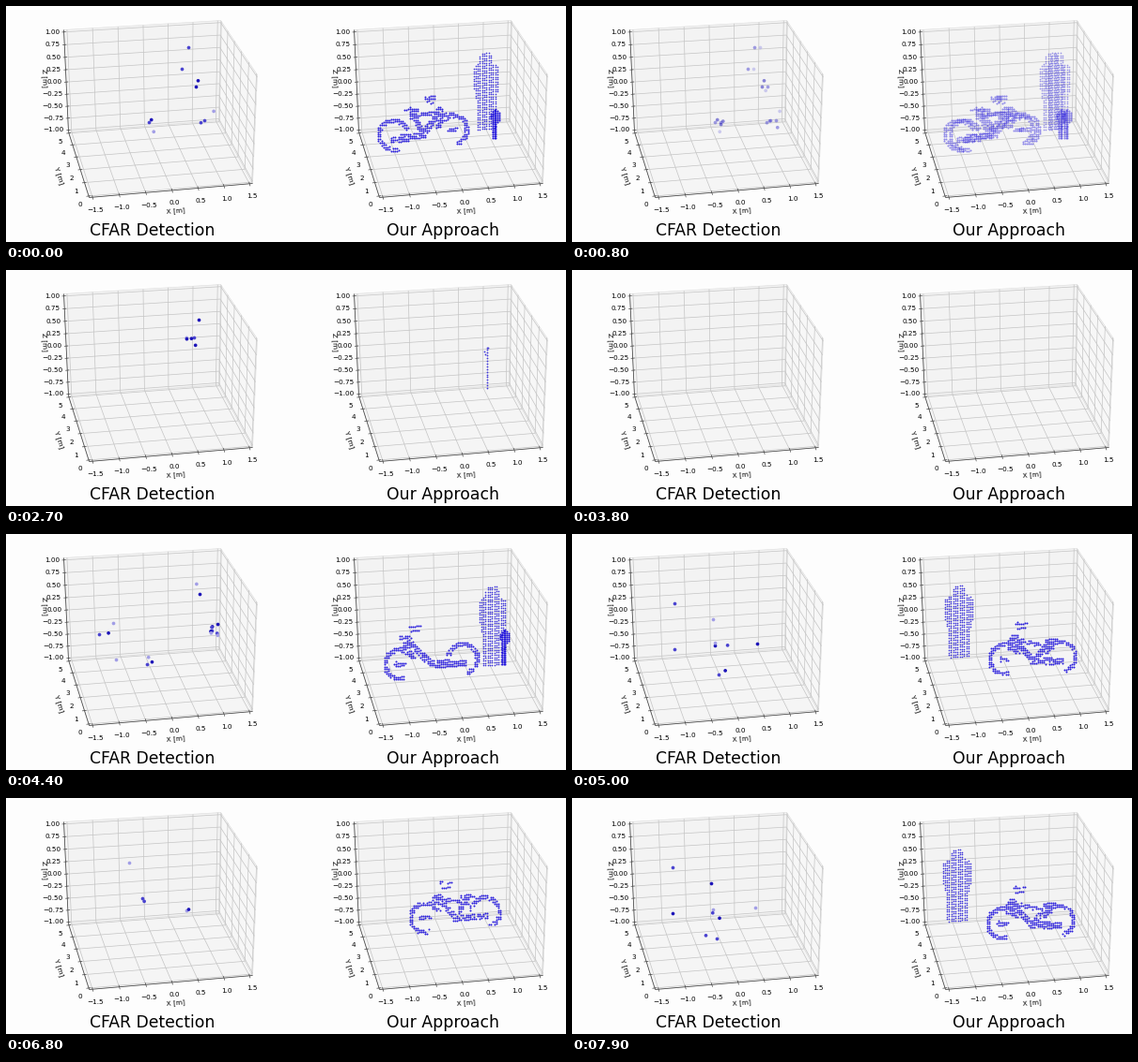
These frames come from a looping animation (596 by 252 pixels, 8 s). A matplotlib script:

```python
import numpy as np
import matplotlib.pyplot as plt
from matplotlib.animation import FuncAnimation
from matplotlib.patches import Polygon

W, H, DPI = 596, 252, 64
PT = 72 / DPI  # points per pixel
STEP_MS, LOOP_MS = 100, 8000
PANEL_SHIFT = 309

plt.rcParams["font.family"] = "DejaVu Sans"
fig = plt.figure(figsize=(W / DPI, H / DPI), dpi=DPI, facecolor="#fdfdfd")
ax = fig.add_axes([0, 0, 1, 1])
ax.set_xlim(-0.5, W - 0.5)
ax.set_ylim(H - 0.5, -0.5)
ax.axis("off")


# ---------- 3D boxes ----------
def perspective(quad):
    """Map the unit square onto a quadrilateral."""
    rows, rhs = [], []
    for (u, v), (x, y) in zip([(0, 0), (1, 0), (1, 1), (0, 1)], quad):
        rows += [[u, v, 1, 0, 0, 0, -u * x, -v * x],
                 [0, 0, 0, u, v, 1, -u * y, -v * y]]
        rhs += [x, y]
    m = np.append(np.linalg.solve(rows, rhs), 1).reshape(3, 3)

    def project(u, v):
        x, y, w = m @ (u, v, 1)
        return np.array([x / w, y / w])
    return project


def tick_fractions(count):
    return (np.linspace(0, 1, count) + 1 / 48) / (1 + 2 / 48)


def line(p, q, color, width):
    ax.plot([p[0], q[0]], [p[1], q[1]], color=color, lw=width * PT,
            solid_capstyle="butt", zorder=2)


def label(x, y, text, size=7.2, **kw):
    kw = {"ha": "center", "va": "center", "color": "black", **kw}
    ax.text(x, y, text, fontsize=size * PT, **kw)


def number(value, digits):
    return f"{value:.{digits}f}".replace("-", "\u2212")


def draw_box(dx, title, title_x):
    corners = [(88, 204), (262, 189), (226, 122), (66, 134),
               (61, 25), (228, 15), (267, 73)]
    fl, fr, br, bl, tl, tr, tf = np.array(corners) + (dx, 0)
    xs, ys, zs = tick_fractions(7), tick_fractions(6), tick_fractions(9)
    planes = [([fl, fr, br, bl], xs, ys, "#f5f5f5"),
              ([bl, br, tr, tl], xs, zs, "#f3f3f3"),
              ([br, fr, tf, tr], ys, zs, "#f7f7f7")]
    for quad, us, vs, shade in planes:
        ax.add_patch(Polygon(quad, fc=shade, ec="#dcdcdc", lw=0.6 * PT, zorder=1))
        at = perspective(quad)
        for u in us:
            line(at(u, 0), at(u, 1), "#c4c4c4", 0.7)
        for v in vs:
            line(at(0, v), at(1, v), "#c4c4c4", 0.7)
    for p, q in [(fl, fr), (fl, bl), (bl, tl)]:
        line(p, q, "#4a4a4a", 0.8)

    floor, wall = perspective(planes[0][0]), perspective(planes[1][0])
    for u, v in zip(xs, np.linspace(-1.5, 1.5, 7)):
        x, y = floor(u, 0)
        line((x - 0.5, y - 2), (x + 0.8, y + 2.5), "#4a4a4a", 0.7)
        label(x + 3, y + 13.5, number(v, 1))
    for u, v in zip(ys, range(6)):
        x, y = floor(0, u)
        line((x - 2.5, y + 0.3), (x + 2, y - 0.3), "#4a4a4a", 0.7)
        label(x - 9.5, y + 9, str(v))
    for u, v in zip(zs, np.linspace(-1, 1, 9)):
        x, y = wall(0, u)
        line((x - 2, y + 0.2), (x + 2, y - 0.2), "#4a4a4a", 0.7)
        label(x - 4.5, y, number(v, 2), ha="right")
    label(dx + 180, 218.5, "X [m]", rotation=5)
    label(dx + 56, 181, "Y [m]", rotation=-72)
    label(dx + 40, 76, "Z [m]", rotation=-88)
    label(title_x, 244, title, 17.3, va="baseline", color="black")


# ---------- point clouds ----------
def lattice(x0, x1, y0, y1, dx, dy):
    """Rows of points that rise to the right like the box's X axis."""
    x, y = np.meshgrid(np.arange(x0, x1, dx), np.arange(y0, y1, dy))
    x, y = x.ravel(), y.ravel()
    return x, y - 0.08 * (x - (x0 + x1) / 2)


def on_bar(x, y, p, q, width):
    p, d = np.array(p), np.subtract(q, p)
    t = np.clip(((x - p[0]) * d[0] + (y - p[1]) * d[1]) / (d @ d), 0, 1)
    return np.hypot(x - p[0] - t * d[0], y - p[1] - t * d[1]) < width / 2


def on_arc(x, y, center, radius, start, end, width):
    dx, dy = x - center[0], center[1] - y
    inside = (np.degrees(np.arctan2(dy, dx)) - start) % 360 <= end - start
    return inside & (abs(np.hypot(dx, dy) - radius) < width / 2)


def bike(rng, left, right, bar, seat, fill, radius=15.5):
    """Bicycle spanned by its wheel hubs, handlebar and seat."""
    left, right, bar, seat = map(np.array, (left, right, bar, seat))
    front, rear = sorted((left, right), key=lambda hub: abs(hub[0] - bar[0]))
    crank = (left + right) / 2 + (0, 3)
    head = bar + 0.42 * (front - bar)
    x, y = lattice(left[0] - 22, right[0] + 22, 75, 165, 2, 2.4)
    bars = [(bar - (5, 0), bar + (5, 0), 4), (bar + (-3, 5), bar + (4, 5), 2.5),
            (seat - (6, 0), seat + (6, 0), 4), (seat, crank, 6),
            (head, head + 0.35 * (front - head), 10), (head, crank, 7),
            (head, seat + (0, 8), 4), (crank, rear + (0, 5), 8),
            (front - (4, 0), front + (4, 0), 5)]
    hit = on_arc(x, y, left, radius, 20, 290, 5)
    hit |= on_arc(x, y, right, radius, -75, 175, 5)
    for p, q, width in bars:
        hit |= on_bar(x, y, p, q, width)
    hit &= rng.random(x.size) < fill
    return np.column_stack([x[hit], y[hit]])


def person(cx, top, width, bottom):
    x, y = lattice(cx - width / 2, cx + width / 2, top, bottom, 2.3, 2.6)
    t = (y - top) / (bottom - top)
    half = width * np.interp(t, [0, 0.05, 0.11, 0.18, 0.45, 0.6, 1],
                             [0.18, 0.26, 0.26, 0.52, 0.52, 0.4, 0.34])
    keep = abs(x - cx) < half
    return np.column_stack([x[keep], y[keep]])


def post(x0, y0, bottom, head=9, stem=5):
    x, y = lattice(x0 - 6, x0 + 6, y0 - 6, bottom, 1.7, 1.9)
    hit = on_bar(x, y, (x0, y0 - 2), (x0, y0 + 4), head)
    hit |= on_bar(x, y, (x0, y0), (x0 - 1, bottom), stem)
    return np.column_stack([x[hit], y[hit]])


def thin_pole(x, top, bottom):
    y = np.arange(top, bottom, 2.9)
    tip = [(x - 3, top + 4), (x - 2, top + 7), (x + 1.5, top)]
    return np.vstack([np.column_stack([np.full(y.size, x), y]), tip])


def detections(rng, clusters):
    """Each cluster is (x, y, count): one point on the spot, the rest around it."""
    points = []
    for x, y, count in clusters:
        spread = rng.normal(0, 5, (count, 2))
        spread[0] = 0
        points.append(spread + (x, y))
    return np.vstack(points)


# ---------- scenes ----------
POSES = {
    "coast": dict(bike=((411, 137), (474, 131), (450, 97), (430, 110)), fill=0.92,
                  person=(510, 50, 26, 132), post=(520, 116, 141),
                  clusters=[(194, 44, 1), (187, 67, 1), (202, 86, 2),
                            (152, 124, 3), (211, 122, 3)]),
    "lean": dict(bike=((412, 130), (482, 124), (437, 94), (465, 108)), fill=0.85,
                 person=(509, 51, 27, 132),
                 clusters=[(106, 106, 2), (204, 83, 2), (148, 134, 4), (99, 145, 1)]),
    "pole": dict(pole=(511, 82, 127), clusters=[(205, 53, 1), (200, 72, 5)]),
    "wide": dict(bike=((418, 138), (485, 132), (434, 98), (424, 110)), fill=0.92,
                 person=(517, 56, 28, 140), post=(530, 108, 140),
                 clusters=[(206, 64, 2), (99, 107, 2), (114, 95, 1), (219, 103, 8),
                           (150, 139, 3), (117, 134, 1)]),
    "open": dict(bike=((450, 126), (518, 123), (474, 89), (490, 103)), fill=0.7,
                 person=(406, 52, 25, 132),
                 clusters=[(151, 55, 1), (103, 71, 1), (169, 95, 1),
                           (183, 118, 2), (144, 134, 1)]),
    "small": dict(bike=((445, 127), (509, 121), (467, 90), (490, 104)), fill=0.75,
                  clusters=[(131, 69, 1), (145, 107, 2), (192, 120, 2)]),
    "round": dict(bike=((457, 133), (517, 130), (475, 95), (508, 113)), fill=0.92,
                  person=(409, 55, 30, 133),
                  clusters=[(107, 74, 1), (148, 91, 1), (150, 119, 3),
                            (195, 117, 1), (154, 150, 2), (107, 123, 1)]),
}

# Start time, pose, shift in pixels, and whether it crossfades in
TIMELINE = [
    (0, "coast", 0, False), (800, "coast", 6, True), (1500, "lean", 0, False),
    (2100, "lean", -6, True), (2700, "pole", 0, False), (3300, "lean", -2, False),
    (3800, None, 0, False), (4400, "wide", 0, False), (5000, "round", 2, False),
    (5600, "open", 0, False), (6200, "open", -5, False), (6700, "small", 0, True),
    (7400, "round", -8, False), (7800, "round", 0, True),
]
TONES = np.array(["#a29ee6", "#4a43d0", "#1c14b8"])
POLE_FADE = 2900, 3100


def scatter(points, shift, size, color):
    x, y = np.transpose(points)
    return ax.scatter(x + shift, y, s=(size * PT) ** 2, c=color,
                      linewidths=0, zorder=4, visible=False)


def build(seed, name, shift):
    if name is None:
        return []
    rng, pose, artists = np.random.default_rng(seed), POSES[name], []
    if "person" in pose:
        artists.append(scatter(person(*pose["person"]), shift, 1.65, "#4037da"))
    if "bike" in pose:
        cloud = bike(rng, *pose["bike"], pose["fill"])
        artists.append(scatter(cloud, shift, 2, "#2c20dc"))
    if "post" in pose:
        artists.append(scatter(post(*pose["post"]), shift, 2, "#1f12dc"))
    if "pole" in pose:
        artists.append(scatter(thin_pole(*pose["pole"]), shift, 1.8, "#4037da"))
    dots = detections(rng, pose["clusters"])
    tones = TONES[rng.integers(0, 3, len(dots))]
    return artists + [scatter(dots, shift, 3.7, tones)]


draw_box(0, "CFAR Detection", 155.3)
draw_box(PANEL_SHIFT, "Our Approach", 464.5)
layers = [build(i, name, shift) for i, (_, name, shift, _) in enumerate(TIMELINE)]


def opacities(ms):
    current = max(i for i, cue in enumerate(TIMELINE) if cue[0] <= ms)
    start, name, _, crossfade = TIMELINE[current]
    if crossfade and ms == start:
        return {current - 1: 0.5, current: 0.5}
    if name == "pole":
        begin, end = POLE_FADE
        return {current: np.clip((end - ms) / (end - begin + STEP_MS), 0, 1)}
    return {current: 1}


def update(frame):
    shown = opacities(frame * STEP_MS)
    for i, artists in enumerate(layers):
        for artist in artists:
            artist.set_visible(i in shown)
            artist.set_alpha(shown.get(i, 1))
    return [artist for group in layers for artist in group]


update(0)
anim = FuncAnimation(fig, update, frames=LOOP_MS // STEP_MS, interval=STEP_MS,
                     repeat=True, repeat_delay=0, blit=False)
plt.show()
```
